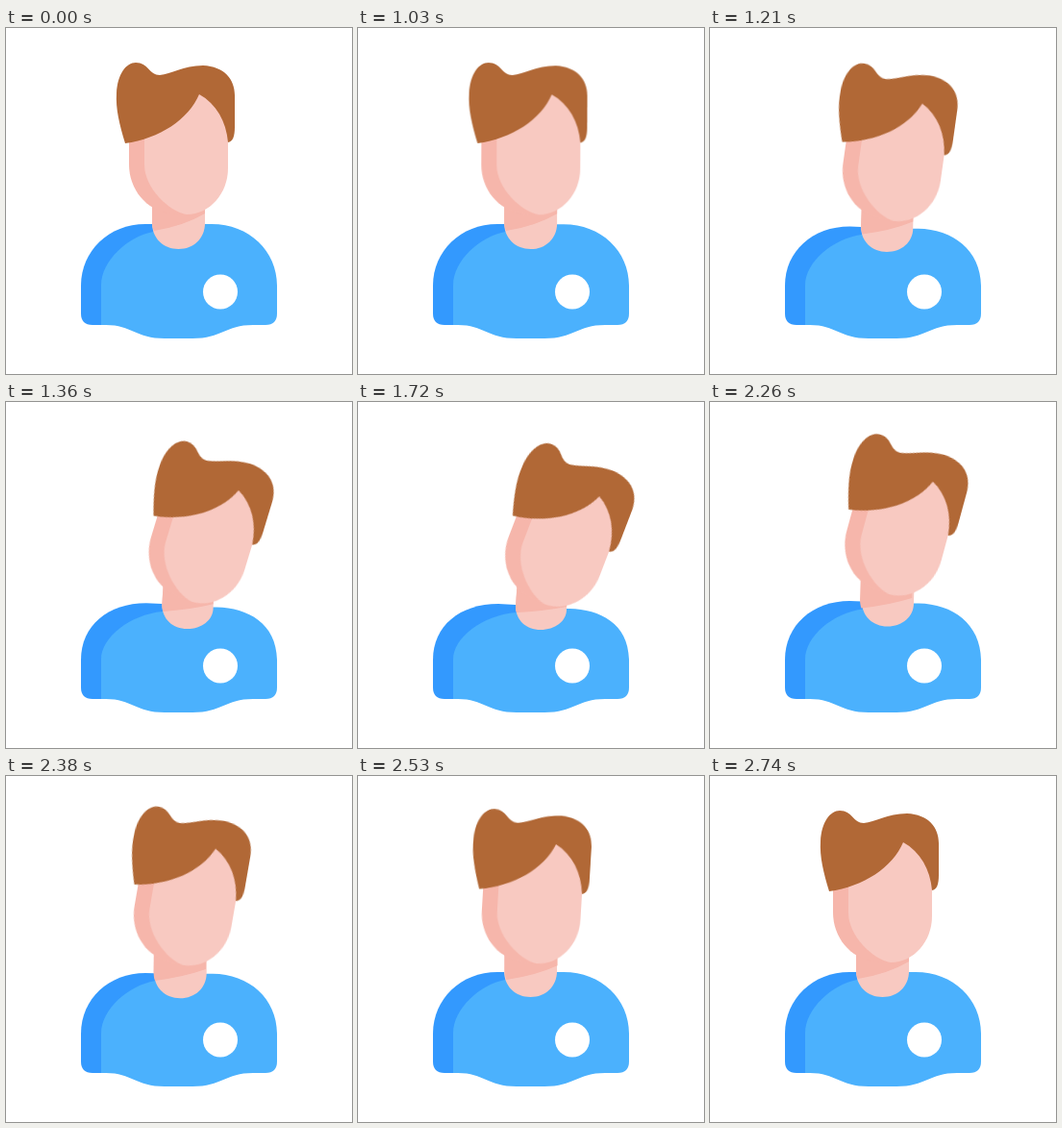
An HTML page without scripts for the animation above (2.77 s loop, 360x360 px).

```html
<!DOCTYPE html>
<html lang="en">
<head>
<meta charset="utf-8">
<title>Head tilt</title>
<style>
  html, body { margin: 0; width: 100%; height: 100%; overflow: hidden; background: #fff; }
  svg { display: block; width: 100vw; height: 100vh; }

  :root {
    --loop: 2770ms infinite;
    --ease: cubic-bezier(.33, 0, .67, 1);
  }

  .hair  { fill: #b16836; }
  .skin  { fill: #f8c9c1; }
  .shade { fill: #f6b6ab; }
  .shirt { fill: #4bb1fd; }
  .side  { fill: #3399fe; }
  .badge { fill: #fff; }

  .shift { animation: shift var(--loop) var(--ease); }
  .tilt  { transform-origin: 180px 200px; animation: tilt var(--loop) var(--ease); }
  .side  { animation: side var(--loop) var(--ease); }
  .shirt { animation: shirt var(--loop) var(--ease); }
  .neck  { animation: neck var(--loop) var(--ease); }
  .cast  { animation: cast var(--loop) var(--ease); }

  @keyframes tilt {
    0%, 36.1% { transform: rotate(0deg); }
    54.3%, 73.3% { transform: rotate(21deg); }
    97.5%, 100% { transform: rotate(0deg); }
  }

  /* the head leans in, then swings back past the neck */
  @keyframes shift {
    0%, 36.1% { transform: translate(0, 0); }
    53.1% { transform: translate(4.5px, 13px); }
    72.2% { transform: translate(4.5px, 13px); animation-timing-function: cubic-bezier(.4, 0, .8, .7); }
    76.2% { transform: translate(2.9px, 10.6px); animation-timing-function: cubic-bezier(.3, .3, .6, 1); }
    85.9% { transform: translate(-4.9px, 1.2px); }
    97.5%, 100% { transform: translate(0, 0); }
  }

  @keyframes side {
    0%, 36.1%, 90.6%, 100% {
      d: path("M78 268C78 232 107 204 145 204L152 204L180 215L180 309L90 309Q78 309 78 297Z");
    }
    53.1%, 72.6% {
      d: path("M78 268C78 233 106 210 146 210L164 211L190 222L180 309L90 309Q78 309 78 297Z");
    }
  }

  @keyframes shirt {
    0%, 36.1%, 90.6%, 100% {
      d: path("M99 309L99 268C99 242 127 217 153 212L207 204L214 204C253 204 282 232 282 268L282 297Q282 309 270 309L257 309C228 309 225 323 194 323L165 323C135 323 131 309 104 309Z");
    }
    53.1%, 72.6% {
      d: path("M99 309L99 268C99 245 130 222 164 219L217 215L220 215C252 216 281 230 282 268L282 297Q282 309 270 309L257 309C228 309 225 323 194 323L165 323C135 323 131 309 104 309Z");
    }
  }

  @keyframes neck {
    0%, 36.1%, 90.6%, 100% {
      d: path("M152 170L152 203C152 219 164 230 179.5 230C195 230 207 219 207 203L207 170Z");
    }
    53.1%, 72.6% {
      d: path("M167 170L164 212C164 227 175 237 190 237C205 237 217 228 217 216L219 175Z");
    }
  }

  /* the shadow under the chin lags behind the neck */
  @keyframes cast {
    0%, 36.1%, 97.5%, 100% {
      d: path("M152 170L152 203C152 206 153 209 154 211Q185 206 207 193L207 170Z");
    }
    53.1%, 72.6% {
      d: path("M167 170L164 212C164 214 164 216 165 219Q191 218 217 213L219 175Z");
    }
    85.9% {
      d: path("M154 170L153.5 204C153.5 207 154 210 155 213Q185 209 208 201L208 170Z");
    }
  }
</style>
</head>
<body>
<svg viewBox="0 0 360 360" xmlns="http://www.w3.org/2000/svg">
  <path class="side"/>
  <path class="shirt"/>
  <circle class="badge" cx="223" cy="274.5" r="18"/>

  <path class="skin neck"/>
  <path class="shade cast"/>

  <g class="shift">
    <g class="tilt">
      <path class="shade" d="M128 90V142C128 167 145 190 172 193L188 194V90Z"/>
      <path class="skin" d="M144 90V142C144 167 170 191 188 194C212 194 231 172 231 146V118C231 80 205 62 180 65Z"/>
      <path class="hair" d="M124 120C118 100 114 84 115 68C116 48 125 36 135 36C148 36 149 49 160 49C172 48 184 39 205 39C227 40 238 53 238 70V103C238 113 236 118 231 119C229 97 219 79 201 69C190 95 160 115 124 120Z"/>
    </g>
  </g>
</svg>
</body>
</html>
```
